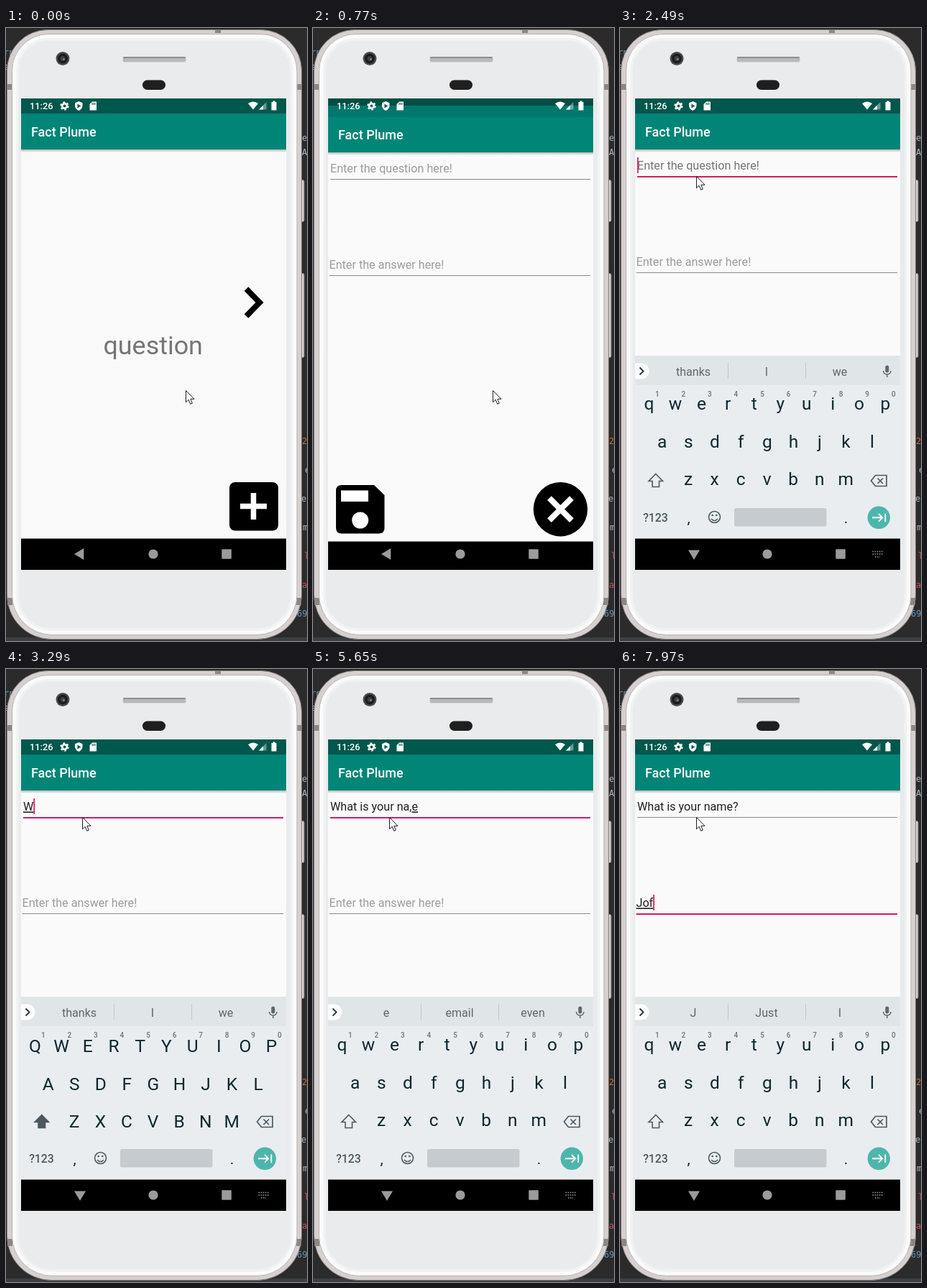
Recreate the animation shown at these times as an HTML page. Size 419 px wide and 853 px high, loop 8000 ms.

```html
<!DOCTYPE html>
<html lang="en">
<head>
<meta charset="utf-8">
<title>Phone demo</title>
<style>
html, body { margin: 0; width: 100%; height: 100%; overflow: hidden; background: #2b2b2b; }
svg { display: block; width: 419px; height: 853px; font-family: Roboto, sans-serif; }
text { white-space: pre; }
.title { font-size: 18px; font-weight: 500; fill: #fff; }
.field { font-size: 16.15px; fill: #212121; }
.word { text-decoration: underline; text-decoration-thickness: 1px; text-underline-offset: 2px; }
.code { font: 12px "DejaVu Sans Mono", monospace; }
.mid { text-anchor: middle; }
.key { font-size: 24.5px; fill: #0d2730; }
.digit { font-size: 10px; font-weight: 500; fill: #69757b; }
.tip { font-size: 16.1px; fill: #5d686e; }
</style>
</head>
<body>
<svg viewBox="0 0 419 853">
  <defs>
    <clipPath id="screen"><rect x="21" y="98" width="369" height="656"/></clipPath>
    <clipPath id="reveal"><rect id="revealBox" x="21" y="98" width="369" height="656"/></clipPath>
    <linearGradient id="shade" x2="0" y2="1">
      <stop stop-color="#000" stop-opacity=".28"/><stop offset="1" stop-color="#000" stop-opacity="0"/>
    </linearGradient>
    <path id="face" d="M59 8.500H354A51 51 0 0 1 405 59.500V788.500A56 56 0 0 1 349 844.500H64.500A56 56 0 0 1 8.500 788.500V59.500A51 51 0 0 1 59 8.500Z"/>
    <clipPath id="faceClip"><use href="#face"/></clipPath>
    <g id="bar">
      <rect x="21" y="119" width="369" height="50" fill="#008577"/>
      <rect x="21" y="169" width="369" height="4" fill="url(#shade)"/>
      <text class="title" x="35" y="151">Fact Plume</text>
    </g>
  </defs>

  <rect width="419" height="853" fill="#2b2b2b"/>
  <rect y="848" width="419" height="5" fill="#3c3f41"/>
  <g class="code">
    <text x="-3" y="38" fill="#6897bb">rp</text><text x="-3" y="58" fill="#a9b7c6">e</text>
    <g fill="#a9b7c6">
      <text x="412" y="157">e</text><text x="412" y="177">A</text><text x="416" y="619">e</text>
      <text x="411" y="659">eD</text><text x="413" y="699">m</text>
    </g>
    <g fill="#cc6b3a"><text x="412" y="579">2</text><text x="415" y="739" fill="#d25252">l</text><text x="412" y="779" fill="#d25252">at</text></g>
    <text x="405" y="819" fill="#6897bb">69</text>
  </g>

  <g fill="#d5d0d0" stroke="#8a8484">
    <rect x="408" y="211.500" width="7" height="58" rx="2"/><rect x="408" y="341.500" width="7" height="117" rx="2"/>
  </g>
  <path d="M58.500 2.500H354.500A57 57 0 0 1 411.500 59.500V788.500A62 62 0 0 1 349.500 850.500H63.500A62 62 0 0 1 1.500 788.500V59.500A57 57 0 0 1 58.500 2.500Z" fill="#d6d0d0" stroke="#8a8282"/>
  <g fill="#8c8686">
    <rect x="2" y="78" width="7" height="8"/><rect x="404" y="78" width="7" height="8"/>
    <rect x="2" y="793" width="7" height="10"/><rect x="404" y="793" width="7" height="10"/>
    <rect x="291" y="3" width="8" height="4"/>
  </g>
  <g clip-path="url(#faceClip)">
    <use href="#face" fill="#e9ebec" stroke="#f1f2f3" stroke-width="18"/>
    <use href="#face" fill="none" stroke="#fbfbfb" stroke-width="11"/>
  </g>
  <use href="#face" fill="none" stroke="#b9b1b1"/>
  <circle cx="79" cy="42.500" r="9.500" fill="#4b4b4b"/><circle cx="79" cy="42.500" r="7" fill="#1c1c1c"/>
  <circle cx="79" cy="42.500" r="3.500" fill="#3c4240"/><circle cx="80.500" cy="43.500" r="1.300" fill="#8b9590"/>
  <rect x="162.500" y="40.500" width="88" height="7" rx="2.500" fill="#b9b9bb" stroke="#d7d8d9"/>
  <rect x="163" y="40" width="87" height="2" rx="1" fill="#8e8e90"/>
  <rect x="190" y="72.500" width="32" height="13.500" rx="6.700" fill="#1f1f1f"/>

  <g clip-path="url(#screen)">
    <rect x="21" y="98" width="369" height="656"/>
    <g id="home">
      <rect x="21" y="98" width="369" height="21" fill="#00574b"/>
      <rect x="21" y="119" width="369" height="592" fill="#f9f9f9"/>
      <use href="#bar"/>
      <path d="M334.500 363L353 382L334.500 401" fill="none" stroke="#000" stroke-width="8"/>
      <text class="mid" x="204.700" y="454" font-size="35.900" fill="#757575">question</text>
      <rect x="311" y="632" width="68" height="67.500" rx="8"/>
      <path d="M326 665.500H363M344.500 647V684" stroke="#fff" stroke-width="7.500"/>
    </g>
    <rect id="scrim" x="21" y="98" width="369" height="613" opacity=".1"/>
    <g clip-path="url(#reveal)">
      <g id="edit">
        <rect x="21" y="98" width="369" height="21" fill="#00574b"/>
        <rect x="21" y="119" width="369" height="592" fill="#fafafa"/>
        <use href="#bar"/>
        <g id="fields"></g>
        <path d="M40 632H85L99.500 646V691.500Q99.500 699.500 91.500 699.500H40Q32 699.500 32 691.500V640Q32 632 40 632Z"/>
        <rect x="39" y="639.500" width="38" height="15.500" fill="#fff"/><circle cx="65.700" cy="681" r="11.500" fill="#fff"/>
        <circle cx="344.500" cy="665.700" r="37.700"/>
        <path d="M329 650.200L360 681.200M360 650.200L329 681.200" stroke="#fff" stroke-width="8"/>
      </g>
    </g>

    <g id="board">
      <rect x="21" y="456" width="369" height="298" fill="#e9edf0"/>
      <rect x="21" y="456" width="369" height="41" fill="#e0e5e8"/>
      <g id="strip">
        <path d="M21 466.500H29.500A11 11 0 0 1 29.500 488.500H21Z" fill="#fbfcfc"/>
        <path d="M27.500 472.500L32.500 477.500L27.500 482.500" fill="none" stroke="#263238" stroke-width="1.800"/>
        <path d="M150.500 466V488M258.500 466V488" stroke="#c0c7cb"/>
        <rect x="369.300" y="469.500" width="5" height="10" rx="2.500" fill="#5d686e"/>
        <path d="M366.500 477Q367 482 371.800 482T377 477M371.800 482V486" fill="none" stroke="#5d686e" stroke-width="1.500"/>
        <text class="tip mid" x="102" y="483.500"></text><text class="tip mid" x="204" y="483.500"></text><text class="tip mid" x="306" y="483.500"></text>
      </g>
      <g id="keys"></g>
      <path id="shift" d="M49.800 620.500L59.500 630.500H54.500V638.500H45V630.500H40Z" stroke="#4c5960" stroke-width="1.600"/>
      <path d="M355.500 622.500H371V637.500H355.500L349.500 630Z" fill="none" stroke="#4c5960" stroke-width="1.700"/>
      <path d="M358.500 626.500L366 634M366 626.500L358.500 634" stroke="#4c5960" stroke-width="1.700"/>
      <text class="mid" x="49.500" y="686.500" font-size="15.800" font-weight="500" fill="#4c5960">?123</text>
      <text class="key mid" x="95.500" y="689" style="font-size:21px">,</text>
      <text class="key mid" x="314.500" y="689" style="font-size:21px">.</text>
      <g fill="none" stroke="#4c5960" stroke-width="1.600"><circle cx="131.500" cy="680.500" r="8"/><path d="M127 683Q131.500 688 136 683"/></g>
      <circle cx="128.700" cy="678" r="1.300" fill="#4c5960"/><circle cx="134.300" cy="678" r="1.300" fill="#4c5960"/>
      <rect x="159" y="668" width="128.500" height="25.500" rx="2.500" fill="#c6cbcf"/>
      <circle cx="360.300" cy="681.300" r="15.700" fill="#4db6ac"/>
      <path d="M351 681.300H365M360 676L365.300 681.300L360 686.600M369.300 675.500V687" fill="none" stroke="#fff" stroke-width="1.900"/>
    </g>

    <rect id="navBack" x="21" width="369" height="44"/>
    <g fill="#9b9b9b">
      <path id="back"/><circle cx="205" cy="732" r="6.600"/><rect x="300.300" y="725.300" width="13.500" height="13.500" rx="1"/>
      <path id="imeIcon" d="M351.500 728.500H366M351.500 732H366M355 736H362" stroke="#9b9b9b" stroke-width="1.600" stroke-dasharray="1.600 1.500"/>
    </g>

    <text x="33" y="113" font-size="12.800" font-weight="500" fill="#fff">11:26</text>
    <g fill="#fff">
      <circle cx="81.500" cy="108.500" r="3.300" fill="none" stroke="#fff" stroke-width="2.800"/>
      <circle cx="81.500" cy="108.500" r="5.200" fill="none" stroke="#fff" stroke-width="2" stroke-dasharray="2.700 2.745"/>
      <path d="M101.300 102L106.500 104.300V108Q106.500 112.700 101.300 115Q96 112.700 96 108V104.300Z"/>
      <path d="M99.500 105.500L104.300 108.500L99.500 111.500Z" fill="#00574b"/>
      <path d="M120 102.500H126V114.500H116.500V106Z"/>
      <path d="M120 104V107M122 104V107M124 104V107" stroke="#00574b"/>
      <path d="M337 105Q344 100 351 105L344 113.500Z"/>
      <path d="M352 113.500L362.500 103V113.500Z" opacity=".4"/><path d="M352 113.500L358 107.500V113.500Z"/>
      <path d="M371.500 103V101.500H374.500V103H376.500V114.500H369.500V103Z"/>
    </g>
  </g>
  <path id="mouse" d="M0 0V16.200L3.700 12.800L6.200 18.800L8.800 17.700L6.300 11.800H11.500Z" fill="#fff" stroke="#1c1c24"/>
</svg>

<script>
const $ = id => document.getElementById(id);
const svg = (parent, tag, attrs, text = '') => {
  const el = document.createElementNS('http://www.w3.org/2000/svg', tag);
  for (const k in attrs) el.setAttribute(k, attrs[k]);
  el.textContent = text;
  return parent.appendChild(el);
};
const show = (el, on) => { el.style.display = on ? '' : 'none'; };
const shift = (el, x, y) => el.setAttribute('transform', `translate(${x} ${y})`);
// Last row whose time has passed
const at = (rows, t) => rows.reduce((hit, row) => row[0] <= t ? row : hit);

const letters = [];
['qwertyuiop', 'asdfghjkl', 'zxcvbnm'].forEach((row, r) => {
  [...row].forEach((c, i) => {
    const x = [40.5, 58.7, 95][r] + 36.55 * i, y = 531 + 52.7 * r;
    letters.push({ c, y, el: svg($('keys'), 'text', { class: 'key mid', x, y }, c) });
    if (!r) svg($('keys'), 'text', { class: 'digit mid', x: x + 11.3, y: 513 }, (i + 1) % 10);
  });
});

function makeField(x, lineY, hint) {
  const g = $('fields'), y = lineY - 8.6;
  const hintEl = svg(g, 'text', { class: 'field', x, y }, hint);
  const text = svg(g, 'text', { class: 'field', x, y });
  const done = svg(text, 'tspan', {}), word = svg(text, 'tspan', { class: 'word' });
  const line = svg(g, 'rect', { x, y: lineY, width: 386 - x });
  const caret = svg(g, 'rect', { y: lineY - 26, width: 1.7, height: 22, fill: '#d81b60' });
  return (a, b, focus, blink) => {
    done.textContent = a;
    word.textContent = b;
    show(hintEl, !(a + b));
    hintEl.style.fill = focus ? '#757575' : '#9c9c9c';
    line.setAttribute('height', focus ? 2 : 1);
    line.setAttribute('fill', focus ? '#d81b60' : '#8a8a8a');
    show(caret, focus && blink);
    caret.setAttribute('x', x + (a + b ? text.getComputedTextLength() : 0));
  };
}
const question = makeField(24, 206, 'Enter the question here!');
const answer = makeField(22.5, 340, 'Enter the answer here!');

// time, settled text, word being composed, suggestions
const common = 'thanks|I|we', ask = 'What is ', your = 'What is your ';
const typing = [
  [0, '', '', common],
  [3290, '', 'W', common],
  [3440, '', 'Wh', 'Wh|What|Who'],
  [3560, '', 'Wha', 'Wha|What|Whatever'],
  [3680, '', 'What', 'What|What is|Whatever'],
  [3800, 'What ', '', 'is|are|the'],
  [3950, 'What ', 'i', 'i|is|I'],
  [4070, 'What ', 'is', 'is|is the|isn\'t'],
  [4220, ask, 'yo', 'y|your|your address'],
  [4340, ask, 'you', 'you|your|you\'re'],
  [4460, ask, 'your', 'your|your address|yours'],
  [4730, your, 'n', 'n|name|new'],
  [4850, your, 'na', 'na|name|names'],
  [5000, your + 'na,', '', common],
  [5130, your + 'na,', 'e', 'e|email|even'],
  [5770, your + 'na,', '', common],
  [5890, your, 'na', 'na|name|names'],
  [6010, your, 'nam', 'nam|name|names'],
  [6160, your, 'name', 'name|names|named'],
  [6620, your + 'name?', '', 'name|names|named'],
  [6770, your + 'name?', '', common]
];
const reply = [[0, '', common], [7850, 'Jo', 'J|Just|I'], [7970, 'Jof', 'J|Just|I']];
const carets = [[0, 0], [2370, 1], [2890, 0], [3290, 1], [5650, 0], [5770, 1], [7450, 0], [7850, 1]];
const mouse = [[0, 250.5, 504.5], [1070, 228.5, 448.5], [1200, 165.5, 290.5], [1320, 125.5, 220.5],
  [1460, 114.5, 211.5], [1580, 108.5, 204.5], [2010, 106.5, 206.5]];
// time, new page offset, top of the revealed part, old page offset
const opening = [[0, 0, 754, 0], [650, 22, 400, -3], [770, 4, 124, -11], [920, 1, 98, 0], [1070, 0, 98, 0]];
// time, keyboard offset, opacity
const rising = [[0, 255, 0], [2010, 150, .5], [2130, 70, 1], [2250, 22, 1], [2370, 0, 1]];

function draw(t) {
  const [, drop, top, lift] = at(opening, t);
  shift($('home'), 0, lift);
  show($('scrim'), t >= 650);
  shift($('edit'), 0, drop);
  $('revealBox').setAttribute('y', top);
  $('navBack').setAttribute('y', 710.5 + drop);

  const [, done, word, tips] = at(typing, t);
  const [, typed, replyTips] = at(reply, t);
  const blink = !!at(carets, t)[1], second = t >= 7050;
  question(done, word, t >= 1860 && !second, blink);
  answer('', typed, second, blink);

  const [, rise, alpha] = at(rising, t), typingOn = t >= 2010;
  show($('board'), typingOn);
  shift($('board'), 0, rise);
  $('board').setAttribute('opacity', alpha);
  (second ? replyTips : tips).split('|').forEach((s, i) => {
    const el = $('strip').querySelectorAll('text')[i];
    el.textContent = t < 2490 ? '' : s;
    el.style.fontSize = s.length > 10 ? '14.6px' : '';
  });

  const caps = t >= 3290 && t < 3440;
  for (const { c, y, el } of letters) {
    el.textContent = caps ? c.toUpperCase() : c;
    el.setAttribute('y', caps ? y + 1.8 : y);
  }
  $('shift').setAttribute('fill', caps ? '#4c5960' : 'none');
  $('back').setAttribute('d', typingOn ? 'M95 726.5H111L103 740Z' : 'M95 732L108.300 724V740Z');
  show($('imeIcon'), typingOn);

  const [, mx, my] = at(mouse, t);
  shift($('mouse'), mx, my);
}

function tick() {
  draw(performance.now() % 8000);
  requestAnimationFrame(tick);
}
tick();
</script>
</body>
</html>
```
